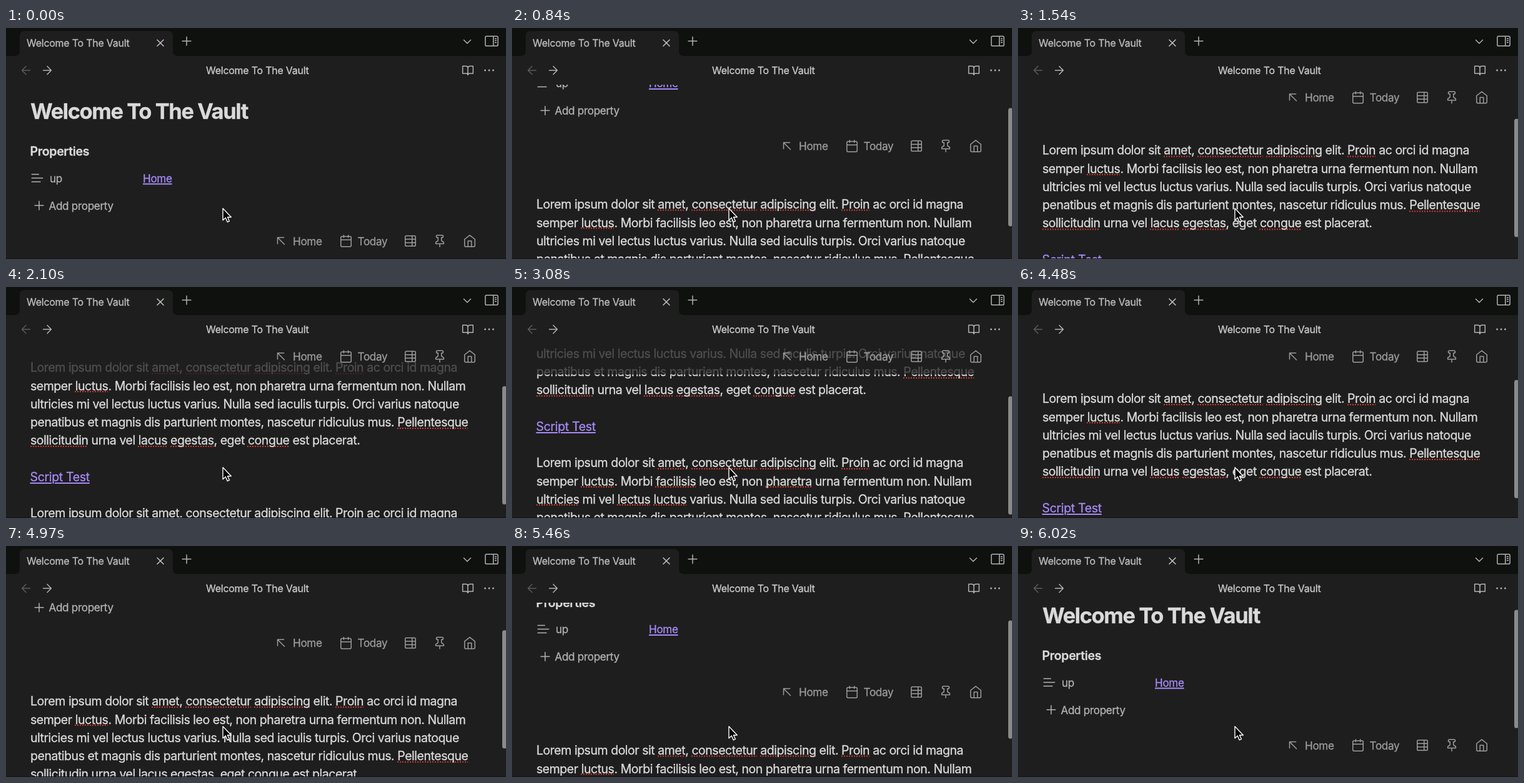
An HTML page that plays this animation: 800 by 371 pixels, repeating every 6.09 s.

```html
<!DOCTYPE html>
<html lang="en">
<head>
<meta charset="utf-8">
<style>
  html, body { margin: 0; width: 100%; height: 100%; overflow: hidden; background: #1e1e1e; }
  #stage { position: relative; width: 800px; height: 371px; overflow: hidden; background: #1e1e1e;
    font-family: Inter, "Liberation Sans", sans-serif; font-optical-sizing: none; letter-spacing: -0.02em;
    -webkit-text-stroke: .3px currentColor; }
  #stage div, svg { position: absolute; }
  .text { white-space: pre; transform: translateY(-50%); }
  .para { white-space: pre; font-size: 19.5px; line-height: 29.25px; letter-spacing: -0.0238em; color: #dcdcdc; }
  .para u { text-decoration: underline dotted #d0392f 2px; text-underline-offset: 2px; text-decoration-skip-ink: none; }
  .link { text-decoration: underline 1.8px; text-underline-offset: 2.2px; }
  svg { overflow: visible; fill: none; stroke-linecap: round; stroke-linejoin: round; }
  #view { inset: 0; clip-path: inset(91px 0 0 0); }
  #doc, #bar, #chrome { left: 0; top: 0; width: 800px; }
  #shade { left: 30px; top: 313px; width: 740px; height: 58px; background: rgba(30, 30, 30, .75); }
  #thumb { left: 793.5px; top: 97.5px; width: 7px; height: 190px; border-radius: 3.5px; background: #8a8a8a; }
  #strip { left: 0; top: 0; width: 800px; height: 45px; background: #0f110f; }
  #edge { left: 0; top: 370px; width: 800px; height: 1px; background: #151213; }
</style>
</head>
<body>
<div id="stage">
  <div id="view">
    <div id="doc"></div>
    <div id="bar"><div id="shade"></div></div>
    <div id="thumb"></div>
  </div>
  <div id="chrome">
    <div id="strip"></div>
    <svg width="800" height="45"><path fill="#1e1e1e" d="M14 45Q22 45 22 37V13Q22 5 30 5H259Q267 5 267 13V37Q267 45 275 45Z"/></svg>
  </div>
  <div id="edge"></div>
  <svg width="800" height="371"><path d="M347 289.8V308.8L351.3 304.8L354.3 311.6L357.4 310.2L354.5 303.7H360.3Z" fill="#000" stroke="#fff" stroke-width="1.4"/></svg>
</div>
<script>
const $ = id => document.getElementById(id);
const doc = $('doc'), bar = $('bar'), chrome = $('chrome'), thumb = $('thumb');

// Text is placed by its left edge and vertical centre.
function text(parent, x, y, size, color, str, extra = '', cls = '') {
  parent.insertAdjacentHTML('beforeend',
    `<div class="text ${cls}" style="left:${x}px;top:${y}px;font-size:${size}px;color:${color};${extra}">${str}</div>`);
}

// Icons are drawn on a 24-unit grid around their centre.
function icon(parent, x, y, color, path, size = 22, weight = 1.5) {
  parent.insertAdjacentHTML('beforeend',
    `<svg viewBox="0 0 24 24" width="${size}" height="${size}" style="left:${x - size / 2}px;top:${y - size / 2}px"
      stroke="${color}" stroke-width="${weight * 24 / size}"><path d="${path}"/></svg>`);
}

function paragraph(y, str) {
  const html = str.replace(/_(\w+)_/g, '<u>$1</u>');
  doc.insertAdjacentHTML('beforeend', `<div class="para" style="left:39px;top:${y - 14.1}px">${html}</div>`);
}

const title = 'Welcome To The Vault';
const accent = '#a68af9', soft = '#b3b3b3', muted = '#9c9c9c';
const plus = 'M12 4.5V19.5M4.5 12H19.5';
const loose = 'letter-spacing:-.012em';

// Window frame
text(chrome, 33, 24, 15.9, '#bdbdbd', title, loose);
icon(chrome, 246.5, 24, '#c4c4c4', 'M6.5 6.5L17.5 17.5M17.5 6.5L6.5 17.5');
icon(chrome, 289, 21, soft, plus);
icon(chrome, 737.5, 21.5, soft, 'M6 9L12 15L18 9');
icon(chrome, 776.5, 21, soft,
  'M3 3.5H21Q23 3.5 23 5.5V18.5Q23 20.5 21 20.5H3Q1 20.5 1 18.5V5.5Q1 3.5 3 3.5ZM15 3.5V20.5M18 7.5H20M18 11H20M18 14.5H20');
icon(chrome, 32, 68, '#5c5c5c', 'M19 12H5M12 19L5 12L12 5');
icon(chrome, 66, 68, soft, 'M5 12H19M12 5L19 12L12 19');
text(chrome, 320, 68, 15.9, '#cacaca', title, loose);
icon(chrome, 738.5, 68, soft, 'M2 4H8A4 4 0 0 1 12 8V21A3 3 0 0 0 9 18H2ZM22 4H16A4 4 0 0 0 12 8V21A3 3 0 0 1 15 18H22Z', 20);
icon(chrome, 773, 68, soft, 'M5 12H5.01M12 12H12.01M19 12H19.01', 22, 2.8);

// Note
text(doc, 39, 133, 34.5, '#dadada', title, 'font-weight:700;letter-spacing:-.041em');
text(doc, 38.5, 198, 19.5, '#dadada', 'Properties', 'font-weight:600');
icon(doc, 50, 241, soft, 'M2.5 5.5H14.5M2.5 12H21.5M2.5 18.5H17.5');
text(doc, 70, 241, 17.1, soft, 'up');
text(doc, 219, 241, 17.1, accent, 'Home', '', 'link');
icon(doc, 53, 284.5, soft, plus);
text(doc, 68.5, 284.5, 17.1, soft, 'Add property');

paragraph(435.5, `Lorem ipsum dolor sit _amet_, _consectetur_ _adipiscing_ elit. _Proin_ ac orci id magna
semper _luctus_. Morbi facilisis leo est, non pharetra urna fermentum non. Nullam
ultricies mi vel lectus luctus varius. Nulla sed iaculis turpis. Orci varius natoque
penatibus et magnis dis parturient montes, nascetur ridiculus mus. _Pellentesque_
_sollicitudin_ urna vel _lacus_ _egestas_, eget _congue_ est placerat.`);
text(doc, 38.5, 611, 19.5, accent, 'Script Test', '', 'link');
paragraph(669.5, `Lorem ipsum dolor sit _amet_, _consectetur_ _adipiscing_ elit. _Proin_ ac orci id magna
semper _luctus_. Morbi _facilisis_ leo est, non _pharetra_ urna fermentum non. Nullam
_ultricies_ mi vel _lectus_ _luctus_ varius. Nulla sed iaculis turpis. Orci varius natoque
penatibus et magnis dis parturient montes, nascetur ridiculus mus. Pellentesque
sollicitudin urna vel lacus egestas, eget congue est placerat.`);

// Sticky button row
icon(bar, 440, 342, muted, 'M6 17V6H17M6 6L18 18');
text(bar, 459, 342, 17.1, muted, 'Home');
icon(bar, 543.5, 342, muted, 'M5 4H19Q21 4 21 6V20Q21 22 19 22H5Q3 22 3 20V6Q3 4 5 4ZM16 2V6M8 2V6M3 10H21');
text(bar, 562.5, 342, 17.1, muted, 'Today');
icon(bar, 646.5, 342, muted, 'M5 3H19Q21 3 21 5V19Q21 21 19 21H5Q3 21 3 19V5Q3 3 5 3ZM15 3V21M3 9H21M3 15H21');
icon(bar, 694, 342, muted,
  'M12 17V22M5 17H19V15.2A2 2 0 0 0 17.9 13.4L16.1 12.5A2 2 0 0 1 15 10.8V6H16A2 2 0 0 0 16 2H8A2 2 0 0 0 8 6H9V10.8A2 2 0 0 1 7.9 12.5L6.1 13.4A2 2 0 0 0 5 15.2Z');
icon(bar, 741.5, 342, muted, 'M3 9L12 2L21 9V20Q21 22 19 22H5Q3 22 3 20ZM9 22V12H15V22');

// Scroll offset over time: monotone cubic through a few [ms, px] points.
const keys = [[0, 0], [210, 0], [840, 152.5], [2100, 306], [2590, 400], [2800, 400],
  [3080, 387], [4480, 256], [5460, 107.5], [6020, 22], [6090, 14]];
const rate = i => (keys[i + 1][1] - keys[i][1]) / (keys[i + 1][0] - keys[i][0]);
const slopes = keys.map((_, i) => {
  if (i === 0 || i === keys.length - 1) return 0;
  const a = rate(i - 1), b = rate(i);
  return a * b > 0 ? 2 * a * b / (a + b) : 0;
});

function scrollAt(t) {
  let i = 0;
  while (i < keys.length - 2 && t >= keys[i + 1][0]) i++;
  const [t0, y0] = keys[i], [t1, y1] = keys[i + 1];
  const span = t1 - t0, u = (t - t0) / span, v = 1 - u;
  return v * v * (1 + 2 * u) * y0 + u * u * (3 - 2 * u) * y1
    + span * u * v * (v * slopes[i] - u * slopes[i + 1]);
}

const LOOP = 6090, STEP = 70;
const shift = (el, y) => { el.style.transform = `translateY(${y}px)`; };

function draw(now) {
  const t = Math.floor((now % LOOP) / STEP) * STEP;
  const scroll = scrollAt(t);
  shift(doc, -scroll);
  shift(bar, Math.max(-scroll, 111.5 - 342));
  shift(thumb, scroll * 0.2);
  thumb.style.visibility = t < 280 ? 'hidden' : 'visible';
}

const start = performance.now();
function tick() {
  draw(performance.now() - start);
  requestAnimationFrame(tick);
}
tick();
</script>
</body>
</html>
```
